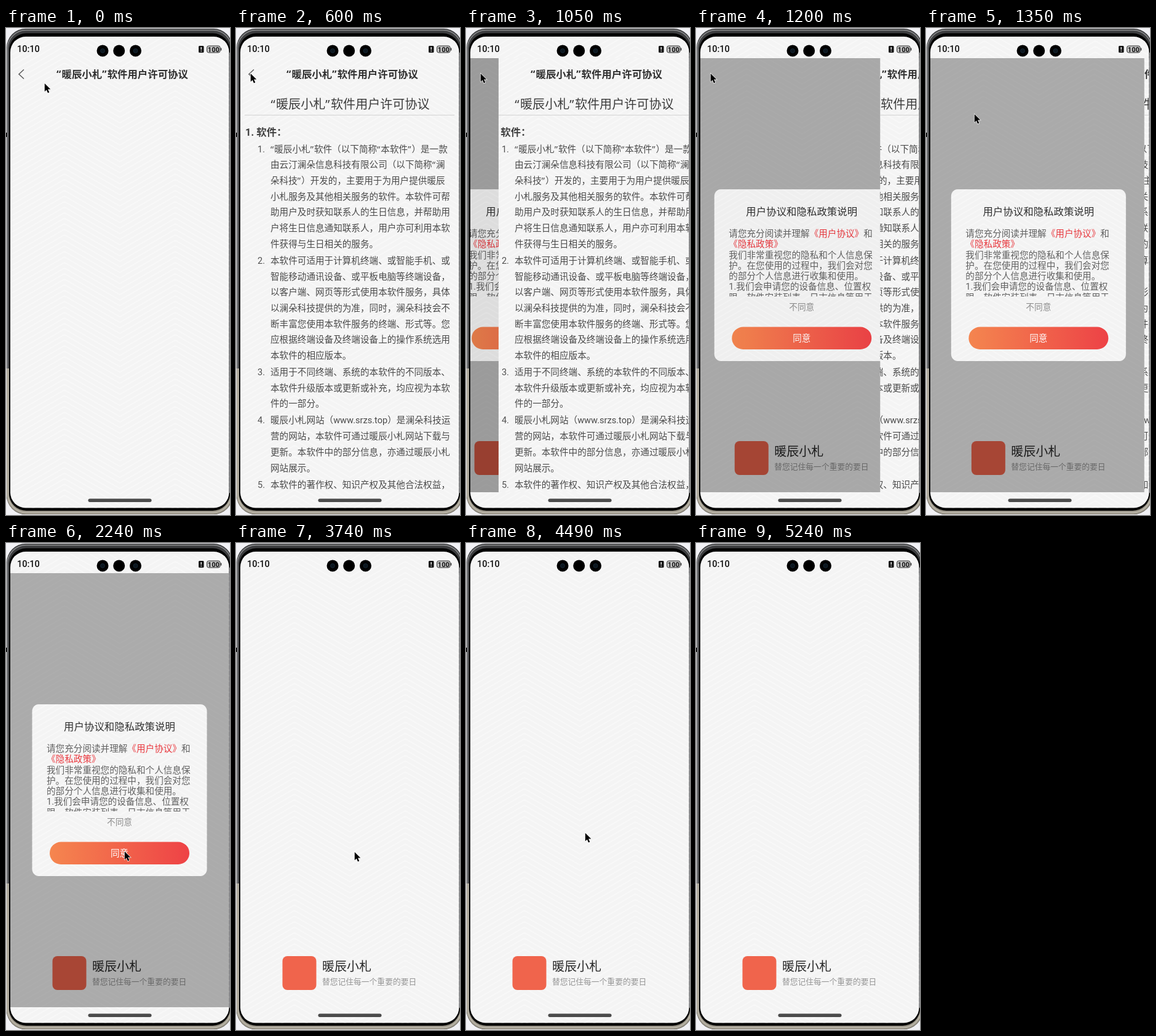
These frames come from a looping animation (364 by 791 pixels, 5550 ms). An HTML page:

```html
<!DOCTYPE html>
<html lang="zh-CN">
<head>
<meta charset="utf-8">
<title>许可协议</title>
<style>
  html, body { margin: 0; width: 100%; height: 100%; overflow: hidden; background: #f1f1f5; }
  svg { display: block; width: 100%; height: 100%; }
  text {
    font-family: Roboto, "Noto Sans CJK SC", "Noto Sans CJK", sans-serif;
    white-space: pre;
    text-spacing-trim: space-all;
  }
  .quote { font-family: "Noto Sans", sans-serif; letter-spacing: .07em; }
</style>
</head>
<body>
<svg viewBox="0 0 364 791" preserveAspectRatio="none">
  <defs>
    <linearGradient id="warm">
      <stop offset="0" stop-color="#f5864f"/>
      <stop offset="1" stop-color="#ee4246"/>
    </linearGradient>
    <clipPath id="screen"><rect x="7" y="14" width="355.5" height="765.5" rx="25"/></clipPath>
    <clipPath id="view"><rect x="7" y="49" width="355.5" height="705"/></clipPath>
    <clipPath id="card"><rect x="42.5" y="262" width="284" height="279" rx="11"/></clipPath>
    <clipPath id="terms"><rect x="60" y="320" width="250" height="116"/></clipPath>
    <clipPath id="lower"><path d="M0 553H364V791H0z"/></clipPath>
    <g id="paper">
      <rect width="364" height="791" fill="#f4f4f4"/>
      <path id="weave" fill="none" stroke="#fff" stroke-width="2" opacity=".3"/>
    </g>
  </defs>

  <!-- phone body: dark metal above, pale metal below, black bezel -->
  <rect x="1" y="1" width="367" height="789" rx="31" fill="#3c3d3f"/>
  <rect x="2.5" y="3.5" width="364" height="784" rx="30" fill="none" stroke="#8a8b8d" stroke-width="1.6"/>
  <g clip-path="url(#lower)">
    <rect x="1" y="1" width="367" height="789" rx="31" fill="#8d887c"/>
    <rect x="3" y="3" width="363" height="784" rx="30" fill="none" stroke="#b5b0a3" stroke-width="3"/>
  </g>
  <rect x="5" y="8.5" width="359" height="775.5" rx="28"/>
  <path d="M363.5 40V755" stroke="#85868a"/>
  <path d="M0 170h1.5v7H0z"/>

  <g clip-path="url(#screen)">
    <use href="#paper"/>
    <g clip-path="url(#view)">
      <g id="home">
        <use href="#paper"/>
        <rect x="75.5" y="671" width="55" height="55" rx="8" fill="#f0644c"/>
        <g id="brand"></g>
        <g id="modal">
          <rect x="7" y="49" width="430" height="705" opacity=".3"/>
          <g clip-path="url(#card)"><use href="#paper"/></g>
          <g id="notice"></g>
          <g id="excerpt" clip-path="url(#terms)"></g>
          <rect x="71" y="485.5" width="227" height="36.5" rx="18.25" fill="url(#warm)"/>
          <g id="agree"></g>
        </g>
      </g>
      <rect id="shade" x="7" y="49" width="356" height="705"/>
      <g id="page" clip-path="url(#view)">
        <g id="sheet">
          <use href="#paper"/>
          <path d="M29 67.5L21 75l8 7.5" fill="none" stroke="#5a5a5a" stroke-width="1.5"/>
          <g id="header"></g>
          <g id="article"><path d="M14 141.5H355" stroke="#d3d3d3"/></g>
        </g>
      </g>
    </g>

    <!-- status bar -->
    <g id="clock"></g>
    <circle cx="157" cy="37" r="9.5"/>
    <circle cx="183.7" cy="37" r="9.5"/>
    <circle cx="210.5" cy="37" r="9.5"/>
    <g fill="#0c161e" stroke="#1a3040" stroke-width=".7">
      <circle cx="157" cy="37" r="3.5"/>
      <circle cx="210.5" cy="37" r="3.5"/>
    </g>
    <rect x="313" y="29" width="8.5" height="11" rx="1.5" fill="#111"/>
    <path d="M317.2 31v4.2m0 1.5v1.5" stroke="#fff" stroke-width="1.4"/>
    <rect x="326.5" y="29" width="21.5" height="11" rx="3" fill="#c4c4c4" stroke="#333"/>
    <path d="M349.5 32.5v4" stroke="#333" stroke-width="1.5"/>
    <g id="battery"></g>
    <rect x="133.5" y="764.5" width="103" height="5.5" rx="2.75" fill="#4b4b4b"/>
  </g>

  <path id="cursor" d="M0 0V13.2L3 10.4 5.2 15.6 7.5 14.6 5.3 9.6H9.6Z"
        stroke="#fff" stroke-width="1.2" paint-order="stroke"/>
</svg>

<script>
const $ = id => document.getElementById(id);
const APP = '暖辰小札', FIRM = '澜朵科技';
const TITLE = `“${APP}”软件用户许可协议`;

// Adds one line of text, placed by the vertical middle of its glyphs.
function write(id, x, middle, size, text, fill, weight = 400, anchor = 'start') {
  const marked = text
    .replace(/[“”]/g, '<tspan class="quote">$&</tspan>')
    .replace(/《.+?》/g, '<tspan fill="#e9393f">$&</tspan>');
  $(id).insertAdjacentHTML('beforeend',
    `<text x="${x}" y="${(middle + size * 0.37).toFixed(2)}" font-size="${size}" fill="${fill}"
      font-weight="${weight}" text-anchor="${anchor}">${marked}</text>`);
}

let weave = '';
for (let y = -60; y < 800; y += 9) weave += `M5 ${y + 52}l90-52 90 52 90-52 90 52`;
$('weave').setAttribute('d', weave);

write('clock', 18, 34, 14.5, '10:10', '#111', 500);
write('battery', 337.3, 34.6, 11, '100', '#111', 700, 'middle');

write('brand', 140, 688, 20, APP, '#262626');
write('brand', 140, 712.5, 12.78, '替您记住每一个重要的要日', '#959595');

write('notice', 184.5, 298, 16.45, '用户协议和隐私政策说明', '#303030', 400, 'middle');
write('notice', 184.5, 453, 13.7, '不同意', '#8c8c8c', 400, 'middle');
write('agree', 184.5, 503.5, 14.6, '同意', '#fff', 400, 'middle');
[
  '请您充分阅读并理解《用户协议》和',
  '《隐私政策》',
  '我们非常重视您的隐私和个人信息保',
  '护。在您使用的过程中，我们会对您',
  '的部分个人信息进行收集和使用。',
  '1.我们会申请您的设备信息、位置权',
  '限、软件安装列表、日志信息等用于'
].forEach((line, i) => write('excerpt', 66, 333.5 + i * 17.3, 14.6, line, '#616161'));

write('header', 189, 74.5, 16.42, TITLE, '#303030', 700, 'middle');
write('article', 185.5, 124, 20.08, TITLE, '#3c3c3c', 400, 'middle');
write('article', 15, 168.5, 16.42, '1. 软件：', '#404040', 700);

const clauses = [
  [`“${APP}”软件（以下简称“本软件”）是一款`,
   '由云汀澜朵信息科技有限公司（以下简称“澜',
   '朵科技”）开发的，主要用于为用户提供暖辰',
   '小札服务及其他相关服务的软件。本软件可帮',
   '助用户及时获知联系人的生日信息，并帮助用',
   '户将生日信息通知联系人，用户亦可利用本软',
   '件获得与生日相关的服务。'],
  ['本软件可适用于计算机终端、或智能手机、或',
   '智能移动通讯设备、或平板电脑等终端设备，',
   '以客户端、网页等形式使用本软件服务，具体',
   `以${FIRM}提供的为准，同时，${FIRM}会不`,
   '断丰富您使用本软件服务的终端、形式等。您',
   '应根据终端设备及终端设备上的操作系统选用',
   '本软件的相应版本。'],
  ['适用于不同终端、系统的本软件的不同版本、',
   '本软件升级版本或更新或补充，均应视为本软',
   '件的一部分。'],
  [`${APP}网站（www.srzs.top）是${FIRM}运`,
   `营的网站，本软件可通过${APP}网站下载与`,
   `更新。本软件中的部分信息，亦通过${APP}`,
   '网站展示。'],
  ['本软件的著作权、知识产权及其他合法权益，']
];
let y = 196.2;
clauses.forEach((lines, i) => {
  write('article', 47, y, 14.6, `${i + 1}.`, '#505050', 400, 'end');
  for (const line of lines) {
    write('article', 56, y, 14.6, line, '#4a4a4a');
    y += 25.7;
  }
  y += 1.3;
});

const steps = [
  [0, 62, 89], [150, 68, 91], [300, 43, 84], [450, 28, 76], [600, 23, 73],
  [1050, 23, 73], [1200, 23, 73], [1350, 78, 139], [1500, 222, 346],
  [1650, 226, 349], [1800, 236, 357], [1950, 254, 472], [2090, 230, 499],
  [2240, 192, 500], [3740, 192, 501], [3890, 191, 492], [4040, 184, 475],
  [4340, 192, 471], [4490, 193, 470], [4640, 272, 501], [4790, 285, 534],
  [4940, 315, 614], [5090, 355, 672], [5240, 400, 700]
];
const LOOP = 5550;

// Critically damped spring that carries the page off to the right.
function slide(t) {
  if (t >= 1500) return 1;
  const u = Math.max(0, t - 1013) * 0.0168;
  return 1 - (1 + u) * Math.exp(-u);
}

const move = (id, x, y = 0) => $(id).setAttribute('transform', `translate(${x} ${y})`);
const show = (id, on) => $(id).setAttribute('display', on ? 'inline' : 'none');

function draw(now) {
  const time = now % LOOP;
  const [t, x, y] = steps.findLast(step => step[0] <= time);
  const p = slide(t);
  move('cursor', x + 0.8, y + 1);
  move('page', 356 * p);
  move('sheet', -178 * p);
  move('home', -71 * (1 - p));
  $('shade').setAttribute('opacity', 0.11 * (1 - p));
  show('page', p < 1);
  show('article', t >= 150);
  show('modal', t < 3740);
}

let start;
function tick(now) {
  start ??= now;
  draw(now - start);
  requestAnimationFrame(tick);
}
draw(0);
requestAnimationFrame(tick);
</script>
</body>
</html>
```
